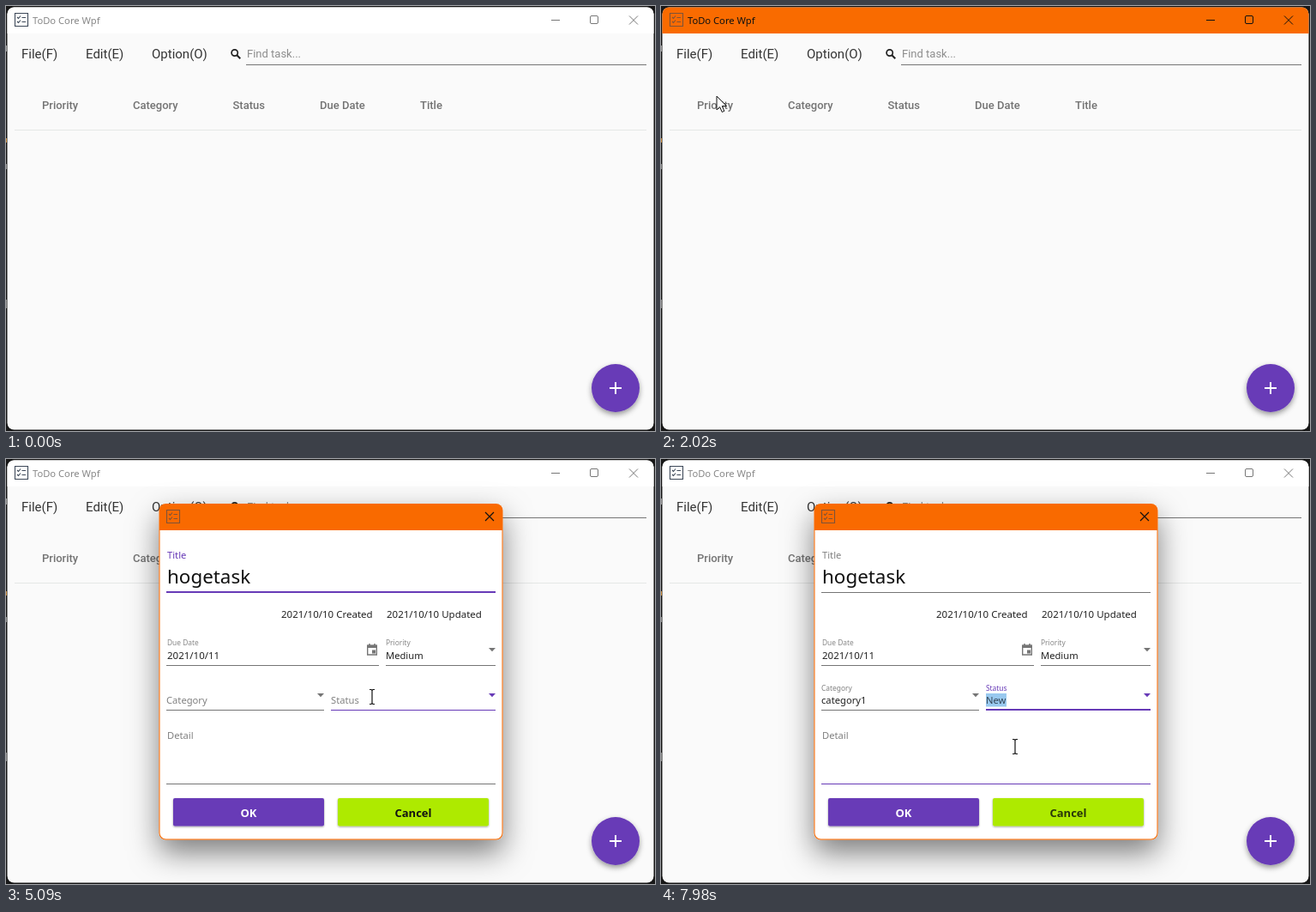
Animation, 757 px wide and 495 px high, one loop 8000 ms. Source, as an HTML page:

```html
<!DOCTYPE html>
<html lang="en">
<head>
<meta charset="utf-8">
<title>ToDo Core Wpf</title>
<style>
html, body { margin: 0; width: 100%; height: 100%; overflow: hidden; background: #171717; }
svg { display: block; width: 757px; height: 495px; }
text { white-space: pre; }
.menu { font-family: Roboto, sans-serif; }
.ui { font-family: "Noto Sans", sans-serif; }
</style>
</head>
<body>
<svg id="stage" viewBox="0 0 757 495"></svg>
<script>
const LOOP = 8000;
const PURPLE = '#673ab7', ORANGE = '#f96b00', GRAY = '#757575';

const text = (x, y, str, size, fill, cls = 'ui', extra = '') =>
  `<text x="${x}" y="${y}" font-size="${size}" fill="${fill}" class="${cls}" ${extra}>${str}</text>`;
const rect = (x, y, w, h, fill, extra = '') =>
  `<rect x="${x}" y="${y}" width="${w}" height="${h}" fill="${fill}" ${extra}/>`;
const path = (d, stroke, width = 1, extra = '') =>
  `<path d="${d}" fill="none" stroke="${stroke}" stroke-width="${width}" ${extra}/>`;
const shadow = (id, dy, blur, opacity) =>
  `<filter id="${id}" x="-30%" y="-30%" width="160%" height="170%">
    <feDropShadow dx="0" dy="${dy}" stdDeviation="${blur}" flood-opacity="${opacity}"/></filter>`;

const appIcon = (x, y, extra = '') =>
  path(`M${x + .5} ${y + .5}h15v15h-15zM${x + 3} ${y + 5}l1.5 1.5l2.5-3M${x + 3} ${y + 10}l1.5 1.5l2.5-3M${x + 8.5} ${y + 5.5}h4.5M${x + 8.5} ${y + 10.5}h4.5`,
    '#3d4858', 1.1, extra);

// An input line: thin rule, plus a thick rule that grows from the middle on focus.
const inputLine = (id, x, y, w) =>
  rect(x, y, w, 1, GRAY, `id="${id}Rule"`) + rect(x, y - 1, w, 2, PURPLE, `id="${id}Focus"`);
const arrow = (id, x, y) => `<path id="${id}Arrow" d="M${x} ${y}h8l-4 4.2z" fill="${GRAY}"/>`;

const button = (x, label, fill, color, id) =>
  `<g id="${id}">${rect(x, 395, 176, 32.5, fill, 'rx="2" filter="url(#small)"')}
  ${text(x + 88, 416.6, label, 13, color, 'ui', `id="${id}Text" font-weight="600" text-anchor="middle"`)}</g>`;

const popup = (id, x, w, items) =>
  `<clipPath id="${id}Item">${rect(x, 301, w, 32, '#000')}</clipPath>
  <clipPath id="${id}Clip">${rect(x - 6, 290, w + 12, 122, '#000', `id="${id}Fold"`)}</clipPath>
  <g id="${id}Popup" clip-path="url(#${id}Clip)">
  ${rect(x, 293, w, 112, '#fafafa', 'rx="2" filter="url(#small)"')}
  ${rect(x, 301, w, 32, '#e6e6e6', `id="${id}Hover"`)}
  <circle id="${id}Ripple" cy="317" fill="#b5b5b5" clip-path="url(#${id}Item)"/>
  ${items.map((s, i) => text(x + 16.5, 322 + 32 * i, s, 11.2, '#555')).join('')}</g>`;

const headers = [[42, 'Priority'], [148, 'Category'], [264.5, 'Status'], [366, 'Due Date'], [483, 'Title']];

document.getElementById('stage').innerHTML = `
<defs>${shadow('small', 1, 1.3, .4)}${shadow('fabShadow', 3, 3, .4)}${shadow('dialogShadow', 15, 17, .5)}
<clipPath id="frame">${rect(1.5, 1.5, 754, 492, '#000', 'rx="8"')}</clipPath></defs>
${rect(0, 0, 757, 495, '#171717')}
${rect(0, 46, 1, 7, '#999')}${rect(0, 154, 1, 5, '#c98a3a')}${rect(0, 184, 1, 6, '#888')}${rect(0, 342, 1, 10, '#888')}
<g clip-path="url(#frame)">
  ${rect(0, 0, 757, 495, '#fafafa')}
  ${rect(0, 0, 757, 32, '#fff', 'id="bar"')}
  ${appIcon(10, 8, 'id="appIcon"')}
  ${text(31, 20.6, 'ToDo Core Wpf', 11.2, '#888', 'ui', 'id="caption"')}
  <g id="controls">${path('M636 16.5h10M683 11.5h6a1.5 1.5 0 0 1 1.5 1.5v6a1.5 1.5 0 0 1-1.5 1.5h-6a1.5 1.5 0 0 1-1.5-1.5v-6a1.5 1.5 0 0 1 1.5-1.5zM727 11.5l10 10M737 11.5l-10 10', 'inherit')}</g>
  ${rect(154, 32, 97, 43, '#dadada', 'id="optionHover"')}
  ${rect(77, 32, 77, 43, '#dadada', 'id="editHover"')}
  <circle id="editRipple" cx="116.5" cy="56.5" fill="#a4a4a4"/>
  ${text(18, 61, 'File(F)', 15, '#333', 'menu')}
  ${text(93, 61, 'Edit(E)', 15, '#333', 'menu', 'id="edit"')}
  ${text(170, 61, 'Option(O)', 15, '#333', 'menu')}
  <circle cx="266.7" cy="54.5" r="3.6" fill="none" stroke="#222" stroke-width="1.7"/>
  ${path('M269.3 57.2l4 4', '#222', 2)}
  ${text(281, 60, 'Find task...', 13, '#8d8d8d', 'menu')}
  ${rect(280, 68, 467, 1, GRAY)}
  ${headers.map(([x, s]) => text(x, 120, s, 13, '#737373', 'menu', 'font-weight="500"')).join('')}
  ${rect(10, 144, 737, 1, '#e5e7e6')}
  <circle cx="711" cy="445" r="28" fill="${PURPLE}" filter="url(#fabShadow)"/>
  ${path('M704 445h14M711 438v14', '#fff', 2)}
  <g id="menu">
    ${rect(-30, 75, 184, 61, '#fafafa', 'filter="url(#small)"')}
    ${rect(-30, 83, 184, 45, '#e4e4e4', 'id="menuHover"')}
    ${text(71, 109, 'New Task(N)...', 15, '#444', 'menu', 'text-anchor="end"')}
    ${text(87, 109, 'Ctrl+N', 14.8, '#444', 'menu')}
  </g>
  <g id="dialog">
    ${rect(178.5, 52, 401, 391.5, ORANGE, 'rx="8" filter="url(#dialogShadow)"')}
    <path d="M179.5 83h399v352a7 7 0 0 1-7 7.500h-385a7 7 0 0 1-7-7.500z" fill="#fff"/>
    ${appIcon(187, 59, 'opacity=".65"')}
    ${path('M559 62l10 10M569 62l-10 10', '#111', 1.2)}
    ${text(188, 116, 'Title', 11.2, GRAY, 'ui', 'id="titleLabel"')}
    ${text(188, 145, '', 22.4, '#111', 'ui', 'id="titleValue"')}
    ${rect(201, 120, 1, 31, '#4a1d66', 'id="caret"')}
    ${inputLine('title', 187, 155, 384)}
    ${text(321, 185, '2021/10/10 Created', 11.5, '#222')}
    ${text(444, 185, '2021/10/10 Updated', 11.5, '#222')}
    ${text(188, 217, 'Due Date', 8.4, '#888')}
    ${text(188, 233, '2021/10/11', 11.5, '#222')}
    ${rect(187, 240, 248, 1, GRAY)}
    ${path('M421.700 217.500h10.600v10.500h-10.600z', GRAY, 1.4)}${rect(421, 216.500, 12, 3.500, GRAY)}
    ${path('M424 215v2M430 215v2', GRAY, 1.5)}${rect(427, 222.5, 4, 4, GRAY)}
    ${text(443, 217, 'Priority', 8.4, '#888')}
    ${text(443, 233, 'Medium', 11.2, '#222')}
    ${arrow('priority', 563, 220)}${rect(443, 240, 128, 1, GRAY)}
    ${rect(187, 273, 52.5, 15.500, '#99c9ef', 'id="catMark"')}
    ${text(187, 285, 'Category', 11.2, GRAY, 'ui', 'id="catLabel"')}
    ${text(187, 285, 'category1', 11.2, '#222', 'ui', 'id="catValue"')}
    ${arrow('cat', 363, 273)}${inputLine('cat', 187, 292, 184)}
    ${rect(379, 273, 24, 15.500, '#99c9ef', 'id="statMark"')}
    ${text(379, 285, 'Status', 11.2, GRAY, 'ui', 'id="statLabel"')}
    ${text(379, 285, 'New', 11.2, '#345', 'ui', 'id="statValue"')}
    ${arrow('stat', 563, 273)}${inputLine('stat', 379, 292, 192)}
    ${text(188, 326, 'Detail', 11.2, '#808080')}
    ${rect(187, 378, 384, 1, GRAY, 'id="detailRule"')}
    ${button(195, 'OK', PURPLE, '#fff', 'ok')}
    ${button(387, 'Cancel', '#aeea00', '#111', 'cancel')}
    ${popup('cat', 187.5, 183, ['category1', 'category2', 'category3'])}
    ${popup('stat', 379.5, 191, ['New', 'Active', 'Closed'])}
  </g>
</g>
<path id="pointer" d="M0 0v16l3.700-3.400 2.500 5.900 2.600-1.100-2.500-5.800h5.200z" fill="#fff" stroke="#111" stroke-linejoin="round"/>
${path('M-3 -8.500h2l1 1l1-1h2M0 -7.500v15M-3 8.500h2l1-1l1 1h2', '#111', 1.2, 'id="beam"')}`;

const el = {};
document.querySelectorAll('[id]').forEach(node => el[node.id] = node);
const set = (id, attrs) => { for (const k in attrs) el[id].setAttribute(k, attrs[k]); };
const show = (id, on) => set(id, { visibility: on ? 'visible' : 'hidden' });

const ramp = (t, start, length) => Math.min(1, Math.max(0, (t - start) / length));
const ease = p => p * p * (3 - 2 * p);
const mix = (a, b, p) => a + (b - a) * p;
const within = (v, a, b) => v >= a && v < b;

const DIALOG = 2160;
const focus = { title: [2750, 5600], cat: [5600, 7000], stat: [7000, LOOP] };
const open = { cat: [5680, 6470], stat: [7080, 7620] };
const keys = [[3250, 'h'], [3330, 'o'], [3420, 'g'], [3500, 'e'], [4130, 't'], [4270, 'a'], [4410, 's'], [4550, 'k']];

// Pointer stops: time, x, y
const route = [
  [200, 410, 310], [420, 372, 262], [680, 215, 66], [960, 118, 57], [1430, 118, 57],
  [1700, 65, 105], [2160, 65, 105], [2600, 427, 137], [4950, 427, 137], [5090, 427, 277],
  [5290, 427, 277], [5550, 310, 281], [5780, 310, 281], [6050, 309, 317], [6580, 309, 317],
  [6880, 420, 281], [7160, 420, 281], [7400, 420, 317], [7700, 420, 317], [7960, 413, 335], [LOOP, 413, 335]
];
function pointerAt(t) {
  const i = Math.max(1, route.findIndex(stop => stop[0] > t));
  const [a, b] = [route[i - 1], route[i]];
  const p = ease(ramp(t, a[0], b[0] - a[0]));
  return [mix(a[1], b[1], p), mix(a[2], b[2], p)];
}

function drawLine(id, t, x, w, hover) {
  const [from, to] = focus[id];
  const focused = within(t, from, to);
  const grown = focused ? w * ease(ramp(t, from, 200)) : 0;
  const color = focused || hover ? PURPLE : GRAY;
  set(id + 'Focus', { x: x + (w - grown) / 2, width: grown });
  set(id + 'Rule', { fill: color });
  if (el[id + 'Arrow']) set(id + 'Arrow', { fill: color });
  set(id + 'Label', { fill: focused ? PURPLE : '#808080' });
}

function drawCombo(id, t, x, y, left, width) {
  const [from, to] = open[id];
  const float = ease(ramp(t, focus[id][0], 200));
  const hover = within(x, left, left + width) && within(y, 262, 294);
  drawLine(id, t, left, width, hover);
  set(id + 'Label', { y: mix(285, 270, float), 'font-size': mix(11.2, 8.4, float) });
  show(id + 'Value', t >= to);
  show(id + 'Mark', t >= to && t < focus[id][1]);
  set(id + 'Popup', { opacity: ramp(t, from, 200) * (1 - ramp(t, to, 200)) });
  set(id + 'Fold', { height: 122 * ease(ramp(t, from, 220)) });
  show(id + 'Hover', t > from && within(y, 301, 333));
  set(id + 'Ripple', { cx: x - 2, r: .22 * Math.max(0, t - to + 70) });
}

function render(t) {
  const [x, y] = pointerAt(t);
  const active = within(t, 200, DIALOG);
  set('bar', { fill: active ? ORANGE : '#fff' });
  set('caption', { fill: active ? '#111' : '#888' });
  set('controls', { stroke: active ? '#111' : '#777' });
  set('appIcon', { opacity: active ? .65 : 1 });

  const menuOpen = within(t, 1300, 1830);
  const onBar = active && within(y, 32, 75);
  const onEdit = menuOpen || onBar && within(x, 77, 154);
  show('optionHover', onBar && within(x, 154, 251));
  show('editHover', onEdit);
  set('edit', { 'font-weight': menuOpen ? 600 : 400, fill: menuOpen ? '#222' : '#333' });
  set('editRipple', { r: Math.min(21, Math.max(0, t - 1300) / 6), opacity: menuOpen ? 1 - ramp(t, 1420, 250) : 0 });
  show('menu', menuOpen);
  show('menuHover', menuOpen && within(y, 83, 128));

  const appear = ease(ramp(t, DIALOG, 220));
  const zoom = mix(.92, 1, appear);
  set('dialog', { opacity: appear, transform: `translate(379 248) scale(${zoom}) translate(-379 -248)` });
  el.dialog.style.display = t < DIALOG ? 'none' : '';

  const float = ease(ramp(t, focus.title[0], 200));
  const typed = keys.filter(key => t >= key[0]).map(key => key[1]).join('');
  drawLine('title', t, 187, 384, within(x, 187, 571) && within(y, 119, 156));
  set('titleLabel', { y: mix(145, 116, float), 'font-size': mix(22.4, 11.2, float) });
  if (el.titleValue.textContent !== typed) el.titleValue.textContent = typed;
  set('caret', { x: Math.floor(188 + (typed ? el.titleValue.getComputedTextLength() : 0)) });
  el.caret.style.display = within(t, focus.title[0], 5000) ? '' : 'none';
  set('ok', { opacity: typed ? 1 : .4 });

  drawCombo('cat', t, x, y, 187, 184);
  drawCombo('stat', t, x, y, 379, 192);
  const listOpen = Object.values(open).some(([a, b]) => within(t, a, b));
  set('detailRule', { fill: !listOpen && t > 5000 && within(y, 305, 379) ? PURPLE : GRAY });
  set('cancelText', { fill: t > 7770 ? '#28350a' : '#111' });

  const visible = t >= 200 && !within(t, 3250, 4950);
  const beam = t > 2500;
  show('pointer', visible && !beam);
  show('beam', visible && beam);
  const place = { transform: `translate(${Math.round(x)} ${Math.round(y)})` };
  set('pointer', place);
  set('beam', place);
}

function tick() {
  render(performance.now() % LOOP);
  requestAnimationFrame(tick);
}
tick();
</script>
</body>
</html>
```
